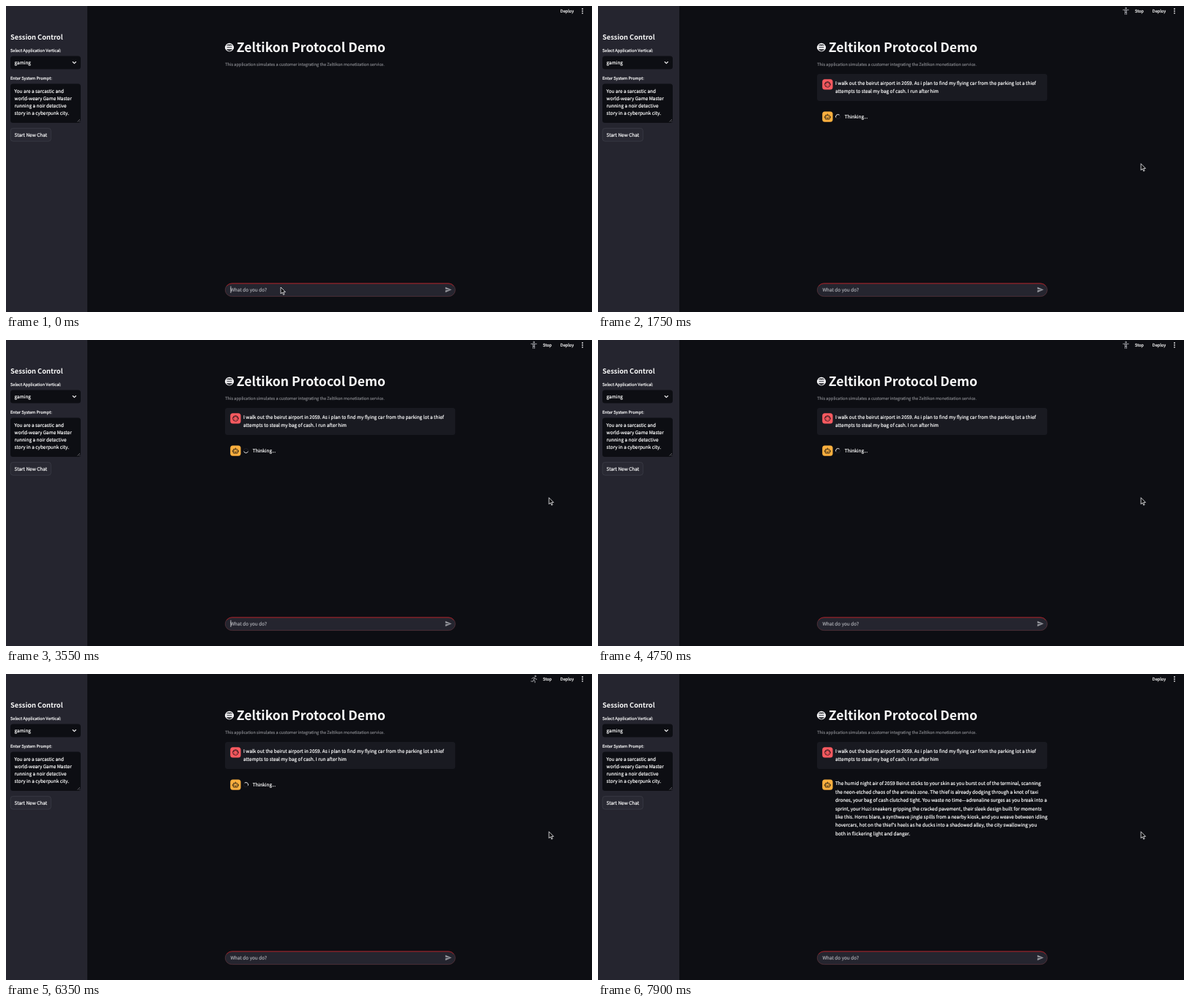
These frames come from a looping animation (800x419 px, 8000 ms). An HTML page:

```html
<!DOCTYPE html>
<html lang="en">
<head>
<meta charset="utf-8">
<title>Chat demo</title>
<style>
  html, body { margin: 0; width: 100%; height: 100%; overflow: hidden; background: #0d0e13; }
  svg { display: block; width: 100%; height: 100%; }
  text {
    font: 6.41px 'Noto Sans CJK JP', 'Noto Sans CJK SC', 'Noto Sans', sans-serif;
    fill: #fafafa; stroke: #fafafa; stroke-width: .2;
    text-rendering: geometricPrecision; white-space: pre;
  }
  .small { font-size: 5.6px; }
  .head { font-size: 9.3px; font-weight: 700; stroke: none; }
  .title { font-size: 17.6px; font-weight: 700; stroke: none; }
  .muted { fill: #7c7d82; stroke: #7c7d82; }
  .hint { fill: #a3a4aa; stroke: #a3a4aa; }
  .line { fill: none; stroke-linecap: round; stroke-linejoin: round; }
</style>
</head>
<body>
<svg viewBox="0 0 800 419">
  <rect width="800" height="419" fill="#0d0e13"/>

  <!-- sidebar -->
  <rect width="111" height="419" fill="#25252f"/>
  <text class="head" x="6" y="46.2">Session Control</text>
  <text class="small" x="6" y="63.2">Select Application Vertical:</text>
  <rect x="6" y="68.5" width="96" height="18" rx="3.5" fill="#0d0e13"/>
  <text x="11.6" y="79.8">gaming</text>
  <path class="line" d="M91.2 76.5l2.1 2.1 2.1-2.1" stroke="#f4f4f6" stroke-width="1.1"/>
  <text class="small" x="6" y="100.8">Enter System Prompt:</text>
  <rect x="6" y="106.5" width="96" height="53.5" rx="3.5" fill="#0d0e13"/>
  <g id="prompt"></g>
  <path d="M97.5 158.5l3.5-3.5M99.7 158.7l1.5-1.5" stroke="#8d8e94" stroke-width=".6"/>
  <rect x="6.2" y="167.4" width="55.2" height="17.8" rx="3.5" fill="#292933" stroke="#42434d" stroke-width=".6"/>
  <text x="11.6" y="178.6">Start New Chat</text>

  <!-- header -->
  <text class="small" x="756.8" y="8.9">Deploy</text>
  <g fill="#f4f4f6">
    <circle cx="787" cy="4" r=".9"/><circle cx="787" cy="6.9" r=".9"/><circle cx="787" cy="9.8" r=".9"/>
  </g>
  <g id="status">
    <text class="small" x="733" y="8.9">Stop</text>
    <g class="line" stroke="#a2a3a8" stroke-width="1">
      <g class="pose"><circle cx="720.6" cy="3" r=".8"/><path d="M716.8 5.3h7.6M719.6 5.3v6.2M721.6 5.3v6.2M719.6 8.5h2"/></g>
      <g class="pose"><circle cx="722.6" cy="3" r=".8"/><path d="M718 6.6l1.4-1.6 2.3.2 1.2 1.6 1.7.4M721.5 5.4l-1.2 3 1.8 1v2.4M720.2 8.6l-.8 1.6-2.6-.3"/></g>
      <g class="pose"><circle cx="722.2" cy="3" r=".8"/><path d="M718.2 5l2.2-.6 1.6 1-1.5 2.2h3l-.4 2.6M722 9.5a2.5 2.5 0 1 1-3-2.8"/></g>
    </g>
  </g>

  <!-- heading -->
  <circle class="line" cx="305" cy="56.7" r="5.3" stroke="#f1f1f3" stroke-width="1.2"/>
  <rect x="298.9" y="54.2" width="12.2" height="5" rx="2.5" fill="#f1f1f3"/>
  <path class="line" d="M302 56.7h6M303 52.9q2-1.2 4 0M303 60.6q2 .9 4 0" stroke="#33343b" stroke-width="1"/>
  <path class="line" d="M302.8 53q2.2-1.3 4.4 0" stroke="#f1f1f3" stroke-width=".8"/>
  <text class="title" x="314.7" y="63.2">Zeltikon Protocol Demo</text>
  <text class="small muted" x="299.2" y="82.4">This application simulates a customer integrating the Zeltikon monetization service.</text>

  <!-- conversation -->
  <g id="question">
    <rect x="299" y="93" width="314.3" height="37" rx="3.5" fill="#191a21"/>
    <rect x="306.2" y="100.2" width="14.3" height="14.3" rx="3.5" fill="#fb5a60"/>
    <g class="line" stroke="#2b171c" stroke-width=".9">
      <circle cx="313.3" cy="107.4" r="3.7"/>
      <path d="M310 106.4q2.4-.3 3.2-2 1.2 1.8 3.5 1.7M311.9 108.3v.1M314.7 108.3v.1"/>
    </g>
  </g>
  <g id="bot">
    <rect x="306.2" y="144.5" width="14.3" height="14.3" rx="3.5" fill="#fdb03f"/>
    <g class="line" stroke="#2e2414" stroke-width=".9">
      <rect x="310.3" y="149.6" width="6" height="5.6" rx=".8"/>
      <path d="M313.3 149.4v-1.4M309.3 151.6v1.2M317.3 151.6v1.2M312 151.5v.1M314.6 151.5v.1M311.9 153.5h2.8"/>
    </g>
  </g>
  <g id="thinking">
    <circle class="line" cx="327.6" cy="151.6" r="3.1" stroke="#22232a" stroke-width=".9"/>
    <path id="spinner" class="line" d="M324.8 150.3A3.1 3.1 0 0 1 330.4 150.3" stroke="#eeeef0" stroke-width=".9"/>
    <text x="336.8" y="153.8">Thinking...</text>
  </g>
  <g id="answer"></g>

  <!-- chat input -->
  <rect id="box" x="299.3" width="314" rx="9" fill="#25252f" stroke="#59343d" stroke-width=".8"/>
  <path id="edge" class="line" d="M301.5 383.2Q304 379.9 308.5 379.9H604Q608.5 379.9 611 383.2" stroke="#ac1b22" stroke-width=".9"/>
  <text id="hint" class="hint" x="306.5" y="390.5">What do you do?</text>
  <g id="draft"></g>
  <path id="caret" d="M306.9 383.6v9.4" stroke="#f4f4f6" stroke-width=".7"/>
  <path fill="#92939a" transform="translate(599 383.6) scale(.41)" d="M2 21L23 12 2 3v7l15 2-15 2z"/>

  <!-- pointer -->
  <g id="pointer">
    <path d="M0 0V9L2.1 7.1 3.6 10.4 5 9.8 3.5 6.6H6.4Z" fill="#08080a" stroke="#f4f4f6" stroke-width=".8" stroke-linejoin="round"/>
    <g id="blocked" fill="#101116" stroke="#f0f0f2" stroke-width="1.2">
      <circle cx="7" cy="13.3" r="4.3"/><path d="M4 10.3l6 6"/>
    </g>
  </g>
</svg>
<script>
const $ = id => document.getElementById(id);
const LOOP = 8000, STEP = 50;

const MESSAGE = [
  'I walk out the beirut airport in 2059. As i plan to find my flying car from the parking lot a thief',
  'attempts to steal my bag of cash. I run after him'
];
const PROMPT = [
  'You are a sarcastic and', 'world-weary Game Master',
  'running a noir detective', 'story in a cyberpunk city.'
];
const ANSWER = [
  'The humid night air of 2059 Beirut sticks to your skin as you burst out of the terminal, scanning',
  'the neon-etched chaos of the arrivals zone. The thief is already dodging through a knot of taxi',
  'drones, your bag of cash clutched tight. You waste no time—adrenaline surges as you break into a',
  'sprint, your Huzi sneakers gripping the cracked pavement, their sleek design built for moments',
  'like this. Horns blare, a synthwave jingle spills from a nearby kiosk, and you weave between idling',
  "hovercars, hot on the thief's heels as he ducks into a shadowed alley, the city swallowing you",
  'both in flickering light and danger.'
];

function addLines(id, x, y, pitch, lines) {
  lines.forEach((line, i) => {
    const text = document.createElementNS('http://www.w3.org/2000/svg', 'text');
    text.setAttribute('x', x);
    text.setAttribute('y', y + i * pitch);
    text.textContent = line;
    $(id).append(text);
  });
}
addLines('prompt', 11.6, 118.9, 10, PROMPT);
addLines('question', 324, 107.9, 11.4, MESSAGE);
addLines('draft', 306.5, 379.6, 11, MESSAGE);
addLines('answer', 324, 152.3, 11.4, ANSWER);

const poses = document.querySelectorAll('.pose');
const clamp = v => Math.max(0, Math.min(1, v));
const ease = v => v * v * (3 - 2 * v);
const progress = (t, from, to) => clamp((t - from) / (to - from));
const show = (el, on) => { el.style.display = on ? '' : 'none'; };

function pointerAt(t) {
  const toSend = ease(progress(t, 50, 350));
  const away = ease(progress(t, 1050, 1300));
  return [
    375.1 + 225.7 * toSend + 140.4 * away,
    385 + toSend - 54 * Math.sin(Math.PI * toSend) - 170.2 * away
  ];
}

function draw(t) {
  const drafting = t >= 50 && t < 500;
  const answered = t >= 7750;

  show($('question'), t >= 600);
  show($('bot'), t >= 800);
  show($('thinking'), t >= 1200 && !answered);
  show($('answer'), answered);
  $('spinner').setAttribute('transform', `rotate(${t / 500 * 360 + 145} 327.6 151.6)`);

  show($('status'), t >= 900 && !answered);
  $('status').style.opacity = progress(t, 850, 1300);
  const pose = Math.floor((t + 50) / 100) % 3;
  poses.forEach((el, i) => show(el, i === pose));

  const growth = drafting ? 11 : 0;
  $('box').setAttribute('y', 379.9 - growth);
  $('box').setAttribute('height', 17.7 + growth);
  $('edge').setAttribute('transform', `translate(0 ${-growth})`);
  show($('hint'), !drafting);
  show($('draft'), drafting);
  show($('caret'), !drafting && t % 500 < 250);

  const [x, y] = pointerAt(t);
  $('pointer').setAttribute('transform', `translate(${x} ${y})`);
  show($('blocked'), t >= 500 && t < 1100);
}

function tick() {
  const t = performance.now() % LOOP;
  draw(Math.floor(t / STEP) * STEP);
  requestAnimationFrame(tick);
}
tick();
</script>
</body>
</html>
```
